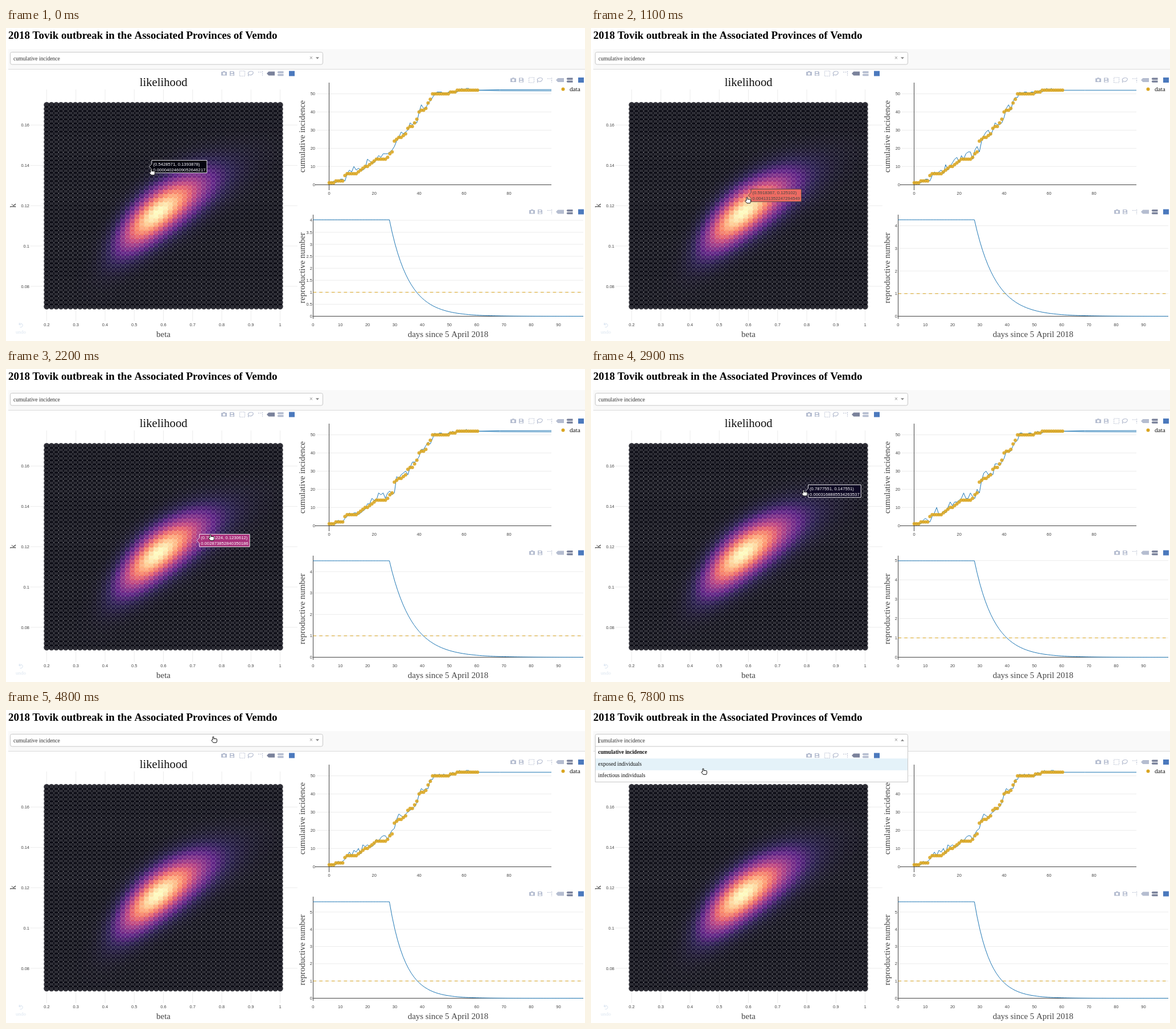
An HTML page with a canvas that plays this animation: 1017x550 px, repeating every 8 s.

```html
<!DOCTYPE html>
<html lang="en">
<head>
<meta charset="utf-8">
<title>Outbreak dashboard</title>
<style>
html, body { margin: 0; width: 100%; height: 100%; overflow: hidden; background: #fff; }
canvas { display: block; }
</style>
</head>
<body>
<canvas id="stage" width="1017" height="550"></canvas>
<script>
const W = 1017, H = 550, LOOP = 8000, OPEN = 5400;
const c = document.getElementById('stage').getContext('2d');
const SERIF = '"Liberation Serif", "Times New Roman", serif';
const SANS = '"Liberation Sans", Arial, sans-serif';
const BLUE = '#1f77b4', GOLD = '#daa520', AXIS = '#444', GRID = '#ececec';
const LIGHT = '#b5bdd0', DARK = '#7a829b';

// position along a list of [key, ...values], linear between the keys
function along(keys, t) {
  const n = keys.findIndex(e => e[0] > t);
  if (n < 1) return (n ? keys[keys.length - 1] : keys[0]).slice(1);
  const a = keys[n - 1], b = keys[n], f = (t - a[0]) / (b[0] - a[0]);
  return a.slice(1).map((v, q) => v + (b[q + 1] - v) * f);
}

// likelihood: a correlated Gaussian in log(beta) and k on a 50 x 50 grid
const N = 50, PEAK = 0.0061;
const MAGMA = ['#04040d', '#1c1044', '#4f127b', '#812581', '#b5367a', '#e55964', '#fb8761', '#fec287', '#fcfdbf']
  .map((h, n) => [n / 8, ...[1, 3, 5].map(p => parseInt(h.slice(p, p + 2), 16))]);
const magma = t => `rgb(${along(MAGMA, t).map(Math.round)})`;
const beta = i => 0.2 + 0.8 * i / (N - 1);
const kOf = j => 0.07 + 0.1 * j / (N - 1);
const gx = i => 71.5 + 8.367 * i;
const gy = j => 489.3 - 7.229 * j;

function level(i, j) {
  const u = Math.log(beta(i) / 0.583) / 0.172;
  const v = (kOf(j) - 0.1169) / 0.0084 - 1.12 * u;
  return Math.exp(-(u * u + v * v) / 2);
}

function makeHeat() {
  const cv = document.createElement('canvas');
  cv.width = W;
  cv.height = H;
  const g = cv.getContext('2d');
  g.globalAlpha = 0.83;
  for (let i = 0; i < N; i++) {
    for (let j = 0; j < N; j++) {
      g.fillStyle = magma(level(i, j));
      g.beginPath();
      g.arc(gx(i), gy(j), 5.2, 0, 7);
      g.fill();
    }
  }
  return cv;
}
const heat = makeHeat();

// cumulative cases by day, rounded between turning points
const TURNS = [[0, 1], [2, 1], [3, 2], [6, 2], [7, 5], [8, 6], [12, 6], [16, 10], [17, 10], [20, 13], [22, 14], [25, 14],
  [28, 18], [29, 24], [34, 28], [35, 31], [37, 32], [39, 36], [40, 40], [43, 42], [46, 50], [52, 50], [58, 52], [66, 52]];
const cases = Array.from({length: 67}, (_, x) => Math.round(along(TURNS, x)[0]));

const random = (seed, x) => Math.abs(Math.sin(seed * 12.9 + x * 78.23) * 43758.5) % 1;

// the fit trails the cases by a day and overshoots at random
function fitAt(x, seed) {
  if (!x) return cases[0];
  const reach = x > 62 ? 0 : x > 45 ? 1 : 4.5 * Math.min(1, x / 12);
  return cases[x - 1] + Math.round(reach * random(seed, x) ** 1.5);
}

// time and grid point of the fitted model
const MODEL = [[0, 21, 34], [300, 21, 34], [1100, 23, 28], [1500, 23, 28], [2200, 25, 25], [3700, 34, 39], [4500, 34, 48]];

// time and place of the pointer
const POINTER = [[0, 257, 253], [50, 303, 355], [300, 303, 355], [1000, 276, 300], [1200, 276, 305], [1400, 334, 356],
  [1500, 334, 356], [2150, 338, 308], [2200, 361, 296], [2800, 380, 222], [3400, 352, 196], [3700, 352, 196],
  [4500, 366, 97], [4800, 366, 52], [5700, 366, 52], [6000, 245, 91], [6500, 199, 108]];

// grid point under the pointer, slightly late
function hovered(t) {
  const [x, y] = along(POINTER, t - 50);
  return [Math.round((x - 7 - gx(0)) / 8.367), Math.round((gy(0) - y + 7) / 7.229)];
}

// drawing helpers
function text(s, x, y, size, color = '#444', align = 'left', family = SERIF, weight = '') {
  c.font = `${weight} ${size}px ${family}`;
  c.fillStyle = color;
  c.textAlign = align;
  c.fillText(s, x, y);
}
const tick = (s, x, y, align) => text(s, x, y, 7.5, '#444', align, SANS);

function upright(s, x, y) {
  c.save();
  c.translate(x, y);
  c.rotate(-Math.PI / 2);
  text(s, 0, 0, 14.9, '#444', 'center');
  c.restore();
}

function line(points, color, width = 1, dash = []) {
  c.beginPath();
  for (const [x, y] of points) c.lineTo(x, y);
  c.strokeStyle = color;
  c.lineWidth = width;
  c.setLineDash(dash);
  c.stroke();
  c.setLineDash([]);
}

function rect(x, y, w, h, color) {
  c.fillStyle = color;
  c.fillRect(x, y, w, h);
}

function dot(x, y, r, color) {
  c.fillStyle = color;
  c.beginPath();
  c.arc(x, y, r, 0, 7);
  c.fill();
}

// offset in the toolbar, path, fill rule or dash pattern
const ICONS = {
  camera: [0, 'M-5-3h2.5l1-1.3h3l1 1.3H5v6.5H-5zM0-2a2.2 2.2 0 1 0 .01 0z', 'evenodd'],
  save: [14, 'M-4-4h6.5L4-2.5V4h-8zM-2.3-3v2.4h4V-3zM-2.5 1v2.2h5V1z', 'evenodd'],
  box: [32, 'M-4.5-4.5h9v9h-9z', [1.6, 1.4]],
  lasso: [46.5, 'M-3 2C-6-1-3-4 1-4S6-1 3 1.5 0 2-3 2c-2 0-1 2 0 2.5', []],
  spike: [64, 'M-4-2.5h7M3.5-4v8', [2, 1.5]],
  tag: [82, 'M-7 0l3.3-3.5H7v7H-3.7z', 'nonzero'],
  pair: [99, 'M-5.5-2.3l1.5-1.8h9.5v3.6h-9.5zM-5.5 2.5l1.5-1.8h9.5v3.6h-9.5z', 'nonzero']
};

function toolbar(x, y, active, select = true) {
  for (const name in ICONS) {
    const [dx, d, style] = ICONS[name], p = new Path2D(d);
    if (!select && (name === 'box' || name === 'lasso')) continue;
    c.save();
    c.translate(x + dx + (!select && dx < 32 ? 33 : 0), y);
    c.fillStyle = c.strokeStyle = name === active ? DARK : LIGHT;
    if (typeof style === 'string') c.fill(p, style);
    else {
      c.lineWidth = 1.2;
      c.setLineDash(style);
      c.stroke(p);
    }
    c.restore();
  }
  rect(x + 114, y - 4.5, 10, 9, '#4b79bd');
}

function likelihoodPlot() {
  text('likelihood', 276.7, 102.3, 20.7, '#111', 'center');
  for (let n = 0; n < 9; n++) {
    const x = 71.5 + 51.25 * n;
    line([[x, 108], [x, 515]], GRID);
    tick(String((n + 2) / 10), x, 524, 'center');
  }
  for (let n = 0; n < 5; n++) {
    const y = 170.6 + 70.83 * n;
    line([[43, y], [512, y]], GRID);
    tick(String((16 - 2 * n) / 100), 41, y + 2.6, 'right');
  }
  c.drawImage(heat, 0, 0);
  text('beta', 276.5, 543, 14.9, '#444', 'center');
  upright('k', 17, 312);
  line([[23.5, 518], [23, 521.5], [26.5, 521.5]], '#d6e2f0');
  c.beginPath();
  c.arc(26, 522.5, 3.3, -2.4, 2);
  c.stroke();
  text('undo', 26, 537, 9, '#dbe5f0', 'center');
}

function incidencePlot(i, j) {
  const px = x => 567.7 + 3.947 * x, py = v => 275.2 - 3.19 * v;
  for (let v = 0; v <= 50; v += 10) {
    if (v) line([[546, py(v)], [958, py(v)]], GRID);
    tick(String(v), 543, py(v) + 2.6, 'right');
  }
  for (let x = 0; x <= 80; x += 20) tick(String(x), px(x), 293, 'center');
  line([[543, 275.5], [958, 275.5]], AXIS);
  line([[567.5, 96], [567.5, 285]], AXIS);
  line(cases.map((v, x) => [px(x), py(fitAt(x, i + N * j))]), BLUE);
  // some forecasts fan out
  const spread = i % 4 === 1 ? 0.35 : 0;
  for (const s of spread ? [-spread, spread] : [0]) {
    line([[px(66), py(52)], [px(76), py(52 + s * 0.8)], [958, py(52 + s)]], BLUE);
  }
  cases.forEach((v, x) => dot(px(x), py(v), 3, 'rgba(218,165,32,.88)'));
  upright('cumulative incidence', 525, 190.5);
  dot(978.5, 107.5, 3, GOLD);
  text('data', 990, 111, 11.2, '#111');
  toolbar(891, 91.5, 'pair');
}

function reproductionPlot(i, j) {
  const r0 = beta(i) / 0.135, k = kOf(j), step = r0 < 4.2 ? 0.5 : 1;
  const px = x => 539.3 + 4.79 * x, py = v => 506.5 - 169.5 * v / r0;
  for (let v = 0; v <= r0 * 1.05; v += step) {
    if (v) line([[539, py(v)], [1014, py(v)]], GRID);
    tick(String(v), 538, py(v) + 2.6, 'right');
  }
  for (let x = 0; x <= 90; x += 10) tick(String(x), px(x), 524, 'center');
  line([[539, 506.5], [1014, 506.5]], AXIS);
  line([[539.5, 328], [539.5, 511]], AXIS);
  line([[539.5, py(1)], [1014, py(1)]], GOLD, 1, [5.6, 5.2]);
  const curve = Array.from({length: 100}, (_, x) => [px(x), py(r0 * Math.exp(-k * Math.max(0, x - 28)))]);
  line(curve, BLUE);
  upright('reproductive number', 525, 421.5);
  text('days since 5 April 2018', 776.5, 543, 14.9, '#444', 'center');
  toolbar(891, 323, 'pair', false);
}

function tooltip(i, j) {
  if (j >= N) return;
  const t = level(i, j), y = gy(j), x = gx(i) + 8.8;
  const top = `(${+beta(i).toFixed(7)}, ${+kOf(j).toFixed(7)})`;
  const low = (t * PEAK).toPrecision(16);
  const ink = t > 0.55 ? '#444' : '#fff';
  c.font = `7.7px ${SANS}`;
  const w = Math.max(c.measureText(top).width, c.measureText(low).width) + 5;
  c.beginPath();
  c.moveTo(x - 4.7, y);
  c.lineTo(x, y - 4.7);
  c.lineTo(x, y - 11);
  c.lineTo(x + w, y - 11);
  c.lineTo(x + w, y + 11);
  c.lineTo(x, y + 11);
  c.lineTo(x, y + 4.7);
  c.closePath();
  c.fillStyle = magma(t);
  c.fill();
  c.strokeStyle = ink;
  c.lineWidth = 0.9;
  c.stroke();
  text(top, x + 2.5, y - 2, 7.7, ink, 'left', SANS);
  text(low, x + 2.5, y + 8, 7.7, ink, 'left', SANS);
}

function header(open) {
  text('2018 Tovik outbreak in the Associated Provinces of Vemdo', 4, 19, 18.95, '#000', 'left', SERIF, 'bold');
  rect(4, 37, 1013, 35, '#f9f9f9');
  rect(4, 72, 1013, 1, '#dadada');
  c.beginPath();
  c.roundRect(7.5, 42.5, 549, 21.5, open ? [3, 3, 0, 0] : 3);
  c.fillStyle = '#fff';
  c.fill();
  c.strokeStyle = '#c8c8c8';
  c.lineWidth = 1;
  c.stroke();
  text('cumulative incidence', 13, 56.5, 9.6, '#333');
  text('×', 536, 56, 10, '#999', 'center', SANS);
  const s = open ? -1.7 : 1.7;
  c.fillStyle = '#888';
  c.beginPath();
  c.moveTo(544, 53 - s);
  c.lineTo(550, 53 - s);
  c.lineTo(547, 53 + s);
  c.fill();
}

function menu(t, tipY) {
  const rowH = 20.7, row = Math.max(0, Math.min(2, Math.floor((tipY - 64) / rowH)));
  rect(7, 64, 550, 63, '#c8c8c8');
  rect(8, 64.5, 548, 61.5, '#fff');
  rect(8, 64.5 + row * rowH, 548, row === 2 ? 20 : rowH, '#e4f2f9');
  ['cumulative incidence', 'exposed individuals', 'infectious individuals'].forEach((s, n) =>
    text(s, 12.5, 77 + rowH * n, 9.6, '#111', 'left', SERIF, n ? '' : 'bold'));
  // blinking caret
  if (Math.floor((t - 5150) / 650) % 2 === 0) rect(13, 48, 1, 10, '#222');
}

const HAND = new Path2D('M-3 1V-4.2a1 1 0 0 1 2 0V-1.5h3.8a1.7 1.7 0 0 1 1.7 1.7V3l-1 2.3h-5.5L-4.8 2c-.9-1.1 .6-2.2 1.8-1z');

function hand(x, y) {
  c.save();
  c.translate(x, y);
  c.fillStyle = '#fff';
  c.strokeStyle = '#111';
  c.lineWidth = 1;
  c.fill(HAND);
  c.stroke(HAND);
  c.restore();
}

function draw(now) {
  const t = Math.floor(now % LOOP / 100) * 100, open = t >= OPEN;
  const [i, j] = along(MODEL, t).map(Math.round), [x, y] = along(POINTER, t);
  rect(0, 0, W, H, '#fff');
  header(open);
  likelihoodPlot();
  incidencePlot(i, j);
  reproductionPlot(i, j);
  if (open) menu(t, y - 5);
  toolbar(383, 80, 'tag');
  tooltip(...hovered(t));
  hand(x, y);
  requestAnimationFrame(draw);
}
requestAnimationFrame(draw);
</script>
</body>
</html>
```
